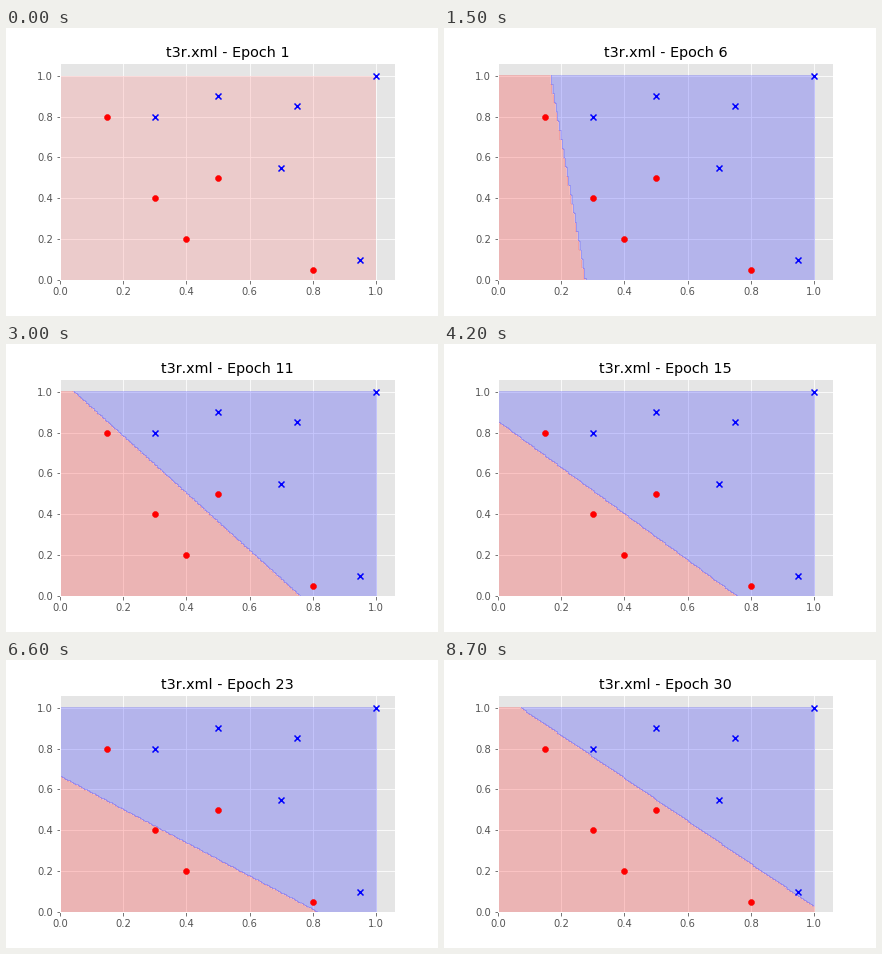
These frames come from a looping animation (432x288 px, 9 s). A matplotlib script:

```python
import numpy as np
import matplotlib.pyplot as plt
from matplotlib.animation import FuncAnimation

EPOCHS, STEP_MS = 30, 300

RED = [(0.15, 0.8), (0.3, 0.4), (0.4, 0.2), (0.5, 0.5), (0.8, 0.05)]
BLUE = [(0.3, 0.8), (0.5, 0.9), (0.7, 0.55), (0.75, 0.85), (0.95, 0.1), (1, 1)]

# Weights of the decision line w1*x + w2*y = 1 at the turning points of training
KEYS = {
    1: (0, 0), 3: (5.95, -1.03), 8: (2.07, 1.355), 11: (1.316, 0.941),
    13: (1.185, 1.137), 15: (1.3245, 1.17), 19: (1.055, 1.5),
    23: (1.227, 1.504), 29: (1.6, 1.6), 30: (0.976, 0.931),
}

plt.rcParams.update({
    "font.family": "DejaVu Sans",
    "font.size": 10,
    "text.kerning_factor": 6,
    "axes.facecolor": "#E5E5E5",
    "axes.edgecolor": "white",
    "axes.linewidth": 1,
    "axes.grid": True,
    "axes.axisbelow": True,
    "axes.titlesize": "x-large",
    "grid.color": "white",
    "grid.linestyle": "-",
    "patch.linewidth": 0.5,
    "xtick.color": "#555555",
    "ytick.color": "#555555",
})

fig = plt.figure(figsize=(6, 4), dpi=72, facecolor="white")
ax = fig.add_axes([0.125, 0.125, 0.775, 0.755])

side = np.linspace(0, 1, 201)
X, Y = np.meshgrid(side, side)


def weights(epoch):
    return [np.interp(epoch, list(KEYS), w) for w in zip(*KEYS.values())]


def draw(i):
    epoch = i + 1
    w1, w2 = weights(epoch)
    pred = (w1 * X + w2 * Y > 1).astype(float)

    ax.clear()
    ax.contourf(X, Y, pred, cmap="bwr_r", alpha=0.25)
    ax.scatter(*zip(*RED), c="red", marker="o", zorder=3)
    ax.scatter(*zip(*BLUE), c="blue", marker="x", zorder=3)
    ax.set_xlim(0, 1.0594)
    ax.set_ylim(0, 1.0645)
    ticks = np.arange(6) / 5
    ax.set_xticks(ticks)
    ax.set_yticks(ticks)
    ax.set_title(f"t3r.xml - Epoch {epoch}")
    return []


anim = FuncAnimation(fig, draw, frames=EPOCHS, interval=STEP_MS,
                     init_func=lambda: [], repeat=True, repeat_delay=0)
plt.show()
```
